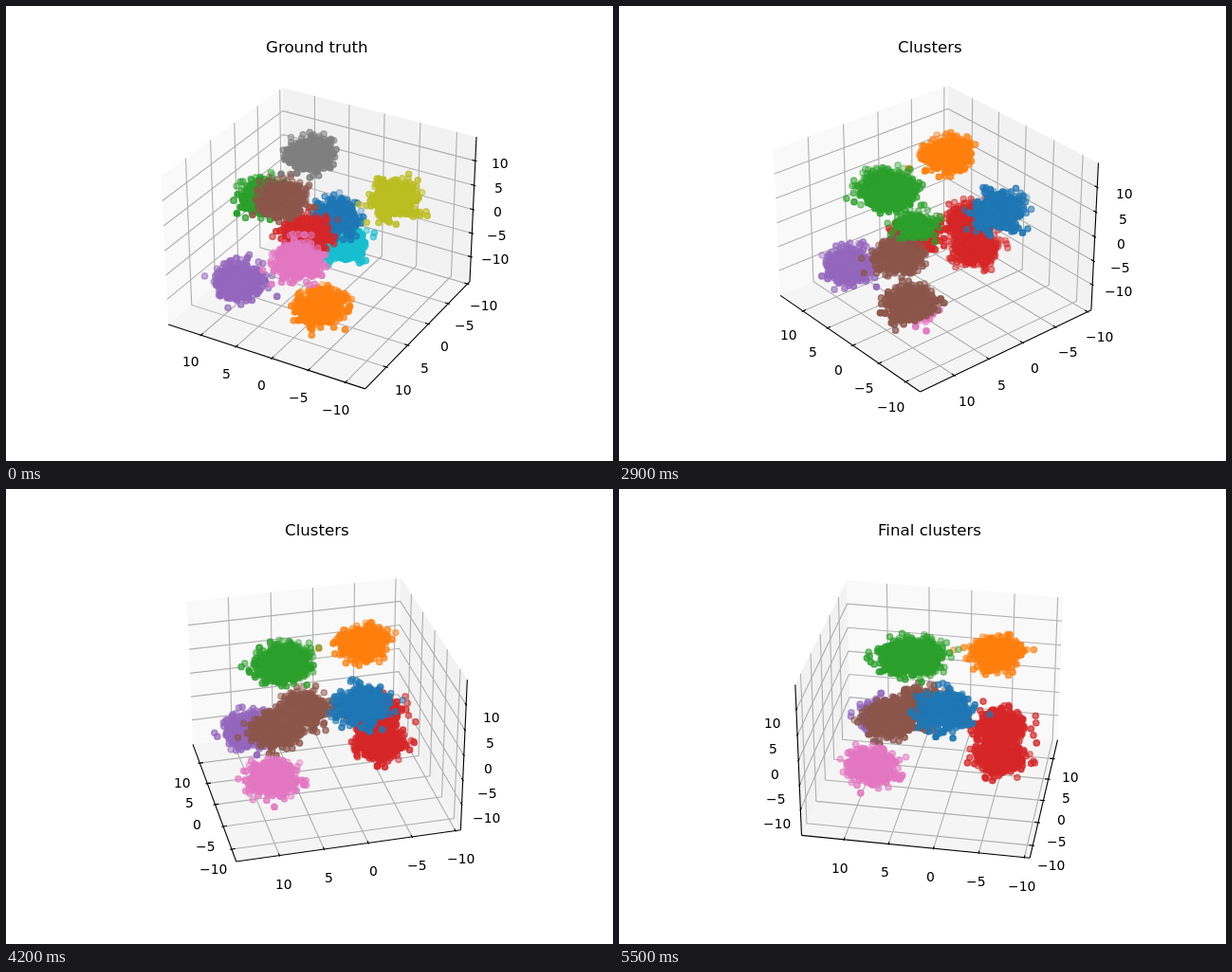
Recreate the animation shown at these times as an HTML page with a canvas. Size 640 px wide and 480 px high, loop 6500 ms.

```html
<!DOCTYPE html>
<html lang="en">
<head>
<meta charset="utf-8">
<title>Clusters</title>
<style>
  html, body { margin: 0; width: 100%; height: 100%; overflow: hidden; background: #fff; }
  canvas { display: block; }
</style>
</head>
<body>
<canvas id="stage" width="640" height="480"></canvas>
<script>
const ctx = document.getElementById('stage').getContext('2d');
const FONT = '"DejaVu Sans", sans-serif';
const COLORS = ['#1f77b4', '#ff7f0e', '#2ca02c', '#d62728', '#9467bd',
                '#8c564b', '#e377c2', '#7f7f7f', '#bcbd22', '#17becf'];

// Box half sizes, label offsets, and data-to-box mapping per axis
const HALF = [0.5952, 0.5952, 0.4464];
const PAD = [0.0988, 0.0988, 0.0741];
const UNIT = [0.0435, 0.0469, 0.0296];
const ZERO = [-0.046, -0.098, 0.0078];
const PANES = ['#f9f9f9', '#f2f2f2', '#f5f5f5'];
const TICKS = [-10, -5, 0, 5, 10];

// Blob centres in box coordinates
const CENTERS = [
  [0.1095, -0.335, -0.110], [-0.172, 0.312, -0.246], [0.285, 0.125, 0.193],
  [0.052, 0.080, 0.010], [0.315, 0.337, -0.226], [0.120, 0.195, 0.250],
  [0.0084, 0.2455, -0.056], [0.230, -0.280, 0.262], [-0.364, -0.112, 0.239],
  [0.055, -0.335, -0.259]
];
const FINAL = [3, 6, 2, 5, 4, 2, 5, 1, 0, 3];
const PER_BLOB = 600, SPREAD = 1.2;

let seed = 7;
function random() {
  seed = (seed + 0x6d2b79f5) | 0;
  let t = Math.imul(seed ^ (seed >>> 15), 1 | seed);
  t = (t + Math.imul(t ^ (t >>> 7), 61 | t)) ^ t;
  return (((t ^ (t >>> 14)) >>> 0) + 1) / 4294967297;
}
const gauss = () => Math.sqrt(-2 * Math.log(random())) * Math.cos(2 * Math.PI * random());

const points = CENTERS.flatMap((c, blob) => Array.from({ length: PER_BLOB }, () => {
  const g = [gauss(), gauss(), gauss()];
  return { blob, g, pos: c.map((v, i) => v + g[i] * UNIT[i] * SPREAD) };
}));

// Piecewise linear value at step k
function key(k, ...stops) {
  if (k <= stops[0][0]) return stops[0][1];
  for (let i = 1; i < stops.length; i++) {
    const [a, u] = stops[i - 1], [b, v] = stops[i];
    if (k <= b) return u + (v - u) * (k - a) / (b - a);
  }
  return stops[stops.length - 1][1];
}

// Boundaries that sweep through the contested blobs as the fit converges
function makeLabeler(k) {
  const cyan = key(k, [0, 0.2], [5, 2], [8, 5]);
  const pink = key(k, [0, -0.7], [5, 0.6], [12, 5]);
  const redLow = key(k, [8, -5], [12, -0.6], [19, 5]);
  const redHigh = key(k, [0, 5], [5, 0.6], [12, -0.1]);
  const back = key(k, [0, 0.3], [5, 1.3], [8, 5]);
  const front = key(k, [6, 5], [12, -0.7], [17, -5]);
  return ({ blob, g: [x, y, z] }) => {
    if (blob === 9) return -z > cyan ? 6 : 3;
    if (blob === 6) return 0.5 * x + 0.87 * z > pink ? 3 : 5;
    if (blob === 3) return z < redLow ? 5 : z > redHigh ? 2 : 3;
    if (blob === 1) {
      return 0.2 * x - 0.87 * y - 0.45 * z > back || -0.8 * x - 0.6 * z > front ? 6 : 5;
    }
    return FINAL[blob];
  };
}

// Perspective camera at 30 degrees elevation
function camera(azim) {
  const a = azim * Math.PI / 180, c = Math.cos(a), s = Math.sin(a);
  return ([x, y, z]) => {
    const h = c * x + s * y;
    const near = 0.866 * h + 0.5 * z;
    const f = 1997.8 / (10 - near);
    return { x: 333 + f * (c * y - s * x), y: 237.4 - f * (0.866 * z - 0.5 * h), near };
  };
}

function path(list) {
  ctx.beginPath();
  for (const p of list) ctx.lineTo(p.x, p.y);
}
function line(color, list) {
  path(list);
  ctx.strokeStyle = color;
  ctx.lineWidth = 1.11;
  ctx.stroke();
}
// Centred text on whole pixels
function write(text, size, x, y) {
  ctx.font = `${size}px ${FONT}`;
  ctx.fillStyle = '#000';
  ctx.fillText(text, Math.round(x - ctx.measureText(text).width / 2), Math.round(y));
}

function drawAxes(azim, project) {
  const farY = azim < 180.5 ? -1 : 1;
  const far = [HALF[0], farY * HALF[1], -HALF[2]];
  // Coordinates of the box edge that carries each axis
  const edges = [[0, -far[1], far[2]], [-far[0], 0, far[2]], [-far[0], far[1], 0]];
  const moved = (p, i, v) => p.map((old, j) => j === i ? v : old);

  for (let i = 0; i < 3; i++) {
    const [j, m] = [0, 1, 2].filter(n => n !== i);
    path([[1, 1], [-1, 1], [-1, -1], [1, -1]].map(([p, q]) =>
      project(moved(moved(far, j, p * HALF[j]), m, q * HALF[m]))));
    ctx.fillStyle = PANES[i];
    ctx.fill();
  }

  for (let i = 0; i < 3; i++) {
    const [j, m] = [0, 1, 2].filter(n => n !== i);
    for (const t of TICKS) {
      const base = moved(far, i, ZERO[i] + t * UNIT[i]);
      line('#b0b0b0', [moved(base, j, -far[j]), base, moved(base, m, -far[m])].map(project));
    }
  }

  for (let i = 0; i < 3; i++) {
    const edge = edges[i], dir = i === 0 ? 1 : 0;
    line('#000', [-HALF[i], HALF[i]].map(v => project(moved(edge, i, v))));
    for (const t of TICKS) {
      const p = moved(edge, i, ZERO[i] + t * UNIT[i]);
      const out = Math.sign(p[dir]);
      line('#000', [0.0095, -0.019].map(d => project(moved(p, dir, p[dir] + out * d))));
      const at = project(p.map((v, j) => j === i ? v : v + Math.sign(v) * PAD[j]));
      write(String(t).replace('-', '\u2212'), 13.89, at.x, at.y + 11);
    }
  }
}

function drawPoints(project, label) {
  const groups = COLORS.map(color => ({ color, dots: [] }));
  for (const p of points) groups[label(p)].dots.push(project(p.pos));
  const used = groups.filter(g => g.dots.length);
  for (const g of used) {
    g.dots.sort((a, b) => a.near - b.near);
    g.low = g.dots[0].near;
    g.high = g.dots[g.dots.length - 1].near;
  }
  used.sort((a, b) => a.high - b.high);

  ctx.lineWidth = 1.5;
  for (const { color, dots, low, high } of used) {
    ctx.fillStyle = ctx.strokeStyle = color;
    for (const d of dots) {
      ctx.globalAlpha = 0.3 + 0.7 * (d.near - low) / (high - low || 1);
      ctx.beginPath();
      ctx.arc(d.x, d.y, 3.1, 0, 2 * Math.PI);
      ctx.fill();
      ctx.stroke();
    }
  }
  ctx.globalAlpha = 1;
}

// step -1 is the ground truth, 0 to 34 the fit, 35 the result
function draw(step) {
  const k = Math.min(step, 34);
  const azim = step < 0 ? 120 : 122 + 2 * k;
  const project = camera(azim);
  ctx.fillStyle = '#fff';
  ctx.fillRect(0, 0, 640, 480);
  drawAxes(azim, project);
  drawPoints(project, step < 0 ? p => p.blob : makeLabeler(k));
  write(step < 0 ? 'Ground truth' : step < 35 ? 'Clusters' : 'Final clusters', 16.67, 328, 49);
}

const start = performance.now();
let shown = null;
function tick() {
  const t = (performance.now() - start) % 6500;
  const step = t < 2000 ? -1 : Math.min(35, Math.floor((t - 2000) / 100));
  if (step !== shown) draw(shown = step);
  requestAnimationFrame(tick);
}
tick();
</script>
</body>
</html>
```
